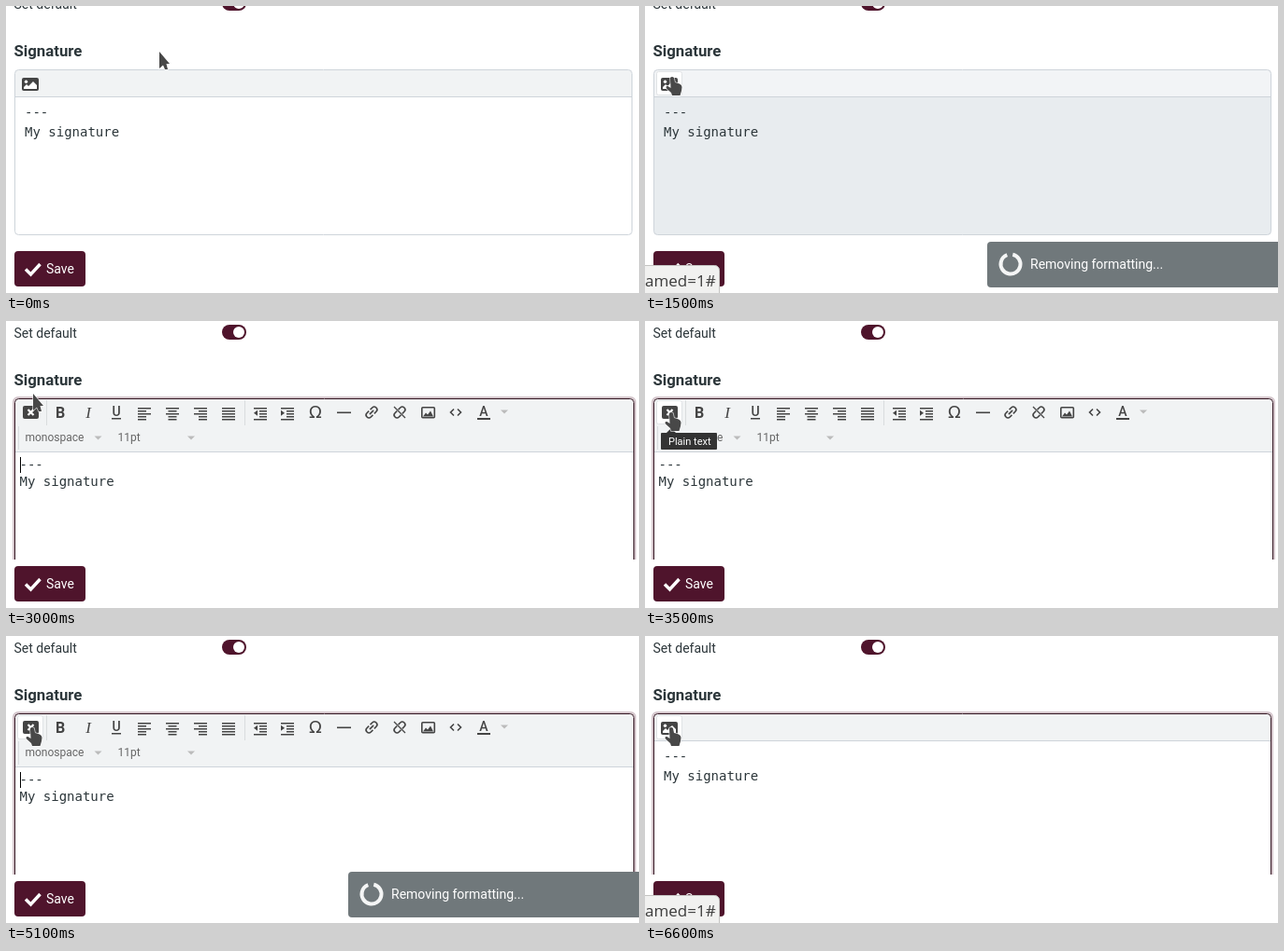
An HTML page with a canvas for the animation above (6.7 s loop, 677 by 308 pixels).

```html
<!DOCTYPE html>
<html lang="en">
<head>
<meta charset="utf-8">
<title>Signature editor</title>
<style>
  html, body { margin: 0; width: 100%; height: 100%; overflow: hidden; background: #fff; }
  canvas { display: block; }
</style>
</head>
<body>
<canvas id="stage" width="677" height="308"></canvas>
<script>
const ctx = document.getElementById('stage').getContext('2d');
const LOOP = 6700, STEP = 100;
const INK = '#2c363a', ICON = '#444', WINE = '#4f142c';
const TO_HTML = 1500, TO_PLAIN = 5100, SWITCH = 300;

const mix = (a, b, k) => a + (b - a) * k;
const clamp = v => Math.max(0, Math.min(1, v));
const between = (t, a, b) => t >= a && t < b;
const mixRgb = (a, b, k) => `rgb(${a.map((v, i) => Math.round(mix(v, b[i], k)))})`;

function box(x, y, w, h, r, fill, stroke, width = 1) {
  ctx.beginPath();
  ctx.roundRect(x, y, w, h, r);
  if (fill) { ctx.fillStyle = fill; ctx.fill(); }
  if (stroke) { ctx.strokeStyle = stroke; ctx.lineWidth = width; ctx.stroke(); }
}

function disc(x, y, r, fill) {
  ctx.beginPath();
  ctx.arc(x, y, r, 0, 7);
  ctx.fillStyle = fill;
  ctx.fill();
}

function text(str, x, y, font, color = INK, align = 'left') {
  ctx.font = font;
  ctx.fillStyle = color;
  ctx.textAlign = align;
  ctx.fillText(str, x, y);
}

function shape(d, x, y, fill, stroke, width = 1) {
  const path = new Path2D(d);
  ctx.save();
  ctx.translate(x, y);
  if (stroke) { ctx.strokeStyle = stroke; ctx.lineWidth = width; ctx.stroke(path); }
  if (fill) { ctx.fillStyle = fill; ctx.fill(path); }
  ctx.restore();
}

const label = (str, x, y, color, size = 14) => text(str, x, y, `${size}px Roboto, sans-serif`, color);
const mono = (str, x, y) => text(str, x, y, '14px "DejaVu Sans Mono", monospace');

function pointer(t) {
  if (t < 2000) {
    const k = clamp((t - 400) / 600), e = (1 - Math.cos(Math.PI * k)) / 2;
    return { x: mix(164, 29, e), y: mix(49, 76, e), hand: between(t, 1000, TO_HTML + SWITCH) };
  }
  if (t < 3000) return { x: 29, y: 76, hand: false };
  const k = clamp((t - 3000) / 500);
  return { x: mix(29, 28, k), y: mix(78, 98, k), hand: k > 0.5 };
}

function drawPointer({ x, y, hand }) {
  const d = hand
    ? 'M-2 1Q0 -1 2 1L3 6L8 7.5Q10.5 8.5 10.5 11L10 15L8.5 20H0L-1 17L-6 12.5Q-7.5 9.5 -4.5 10L-1.5 12Z'
    : 'M0 0V18L4 14.5L6 19H9L7.5 13H11Z';
  shape(d, x, y, '#484848', 'rgba(255,255,255,.75)', 1.5);
}

function drawHeader(y, lock) {
  label('Set default', 8.5, y + 18);
  box(231, y + 4, 26, 16, 8, mixRgb([79, 20, 44], [138, 40, 80], lock));
  disc(249, y + 12, 6, '#fff');
  text('Signature', 8.5, y + 69, 'bold 16.8px Roboto, sans-serif');
}

function drawFrame(y, w, h, bar, focus, fill, barFill) {
  if (focus > 0.5) box(8, y - 1, w + 3, h + 3, 5, null, `rgba(79,20,44,${0.25 * focus})`, 2);
  box(9.5, y + 0.5, w, h, 4, fill);
  box(10, y + 1, w - 1, bar - 1, [3, 3, 0, 0], barFill);
  ctx.fillStyle = '#ced4da';
  ctx.fillRect(10, y + bar, w - 1, 1);
  box(9.5, y + 0.5, w, h, 4, null, mixRgb([206, 212, 218], [50, 20, 32], focus));
}

const hoverBox = y => box(12.5, y + 0.5, 27, 25, 2, '#fff', '#e0e3e5');

function drawPlainEditor(y, lock, locked, focus, hover) {
  drawFrame(y, 660, 177, 29, focus, locked ? '#e8ecef' : '#fff', locked ? '#f2f4f6' : '#f1f3f4');
  if (hover) hoverBox(y + 2);
  box(17, y + 9, 18, 14, 2, ICON);
  disc(21.5, y + 13.3, 1.7, '#fff');
  shape('M0 8V6L3 3L5 5L10 0L14 4V8Z', 19, y + 13, '#fff');
  mono('---', 20, y + 51);
  mono('My signature', 20, y + 72);
}

function drawLines(x, starts, lengths) {
  ctx.fillStyle = ICON;
  starts.forEach((s, i) => ctx.fillRect(x - 7 + s, 93 + i * 3, lengths[i], 1.5));
}

const dropArrow = (x, y) => shape('M-4 -2H4L0 2Z', x, y, '#bbb');

function drawToolbar() {
  const glyph = (str, x, font) => text(str, x, 104, font, ICON, 'center');
  ctx.fillStyle = '#d9dcde';
  ctx.fillRect(43, 85, 1, 27);
  ctx.fillRect(255, 85, 1, 27);
  ctx.fillRect(13, 113, 1, 25);

  box(18, 91, 17, 14, 2, ICON);
  shape('M-3 -3L3 3M3 -3L-3 3', 26.5, 98, null, '#fff', 2.2);

  glyph('B', 58, 'bold 16px Roboto, sans-serif');
  glyph('I', 88, 'italic 17px "Liberation Serif", serif');
  text('U', 118, 102, '500 14px Roboto, sans-serif', ICON, 'center');
  ctx.fillRect(113, 104, 10, 1.5);

  const short = [14, 9, 14, 9, 14].map((n, i) => i === 4 ? 9 : n);
  drawLines(148, [0, 0, 0, 0, 0], short);
  drawLines(178, [0, 2.5, 0, 2.5, 2.5], short);
  drawLines(208, [0, 5, 0, 5, 5], short);
  drawLines(238, [0, 0, 0, 0, 0], [14, 14, 14, 14, 14]);
  for (const [x, dir] of [[272, -1], [301, 1]]) {
    drawLines(x, [0, 6, 6, 6, 0], [14, 8, 8, 8, 14]);
    shape(dir < 0 ? 'M4 -3V3L0 0Z' : 'M0 -3V3L4 0Z', x - 7, 98.8, ICON);
  }

  glyph('Ω', 331, '18px "DejaVu Sans", sans-serif');
  ctx.fillRect(354, 97.5, 15, 1.6);

  const link = 'M-1 -3H-4A3 3 0 0 0 -4 3H-1M1 -3H4A3 3 0 0 1 4 3H1';
  for (const x of [391, 421]) {
    ctx.save();
    ctx.translate(x, 98);
    ctx.rotate(-Math.PI / 4);
    shape(x < 400 ? link + 'M-3 0H3' : link, 0, 0, null, ICON, 1.6);
    ctx.restore();
  }
  shape('M-6 -6L6 6', 421, 98, null, ICON, 1.3);

  box(444.8, 92.8, 13.5, 11, 1, null, ICON, 1.6);
  shape('M-5 4L-2 0L0 2L3 -2L6 4Z', 451, 98.5, ICON);
  shape('M-2 -3.5L-5.5 0L-2 3.5M2 -3.5L5.5 0L2 3.5', 481, 98, null, ICON, 1.6);
  text('A', 511, 102, '500 14px Roboto, sans-serif', ICON, 'center');
  ctx.fillRect(504, 104, 14, 2);
  dropArrow(533, 97.5);

  label('monospace', 20.5, 129, '#666', 12);
  dropArrow(98.5, 125.5);
  label('11pt', 119.5, 129, '#666', 12);
  dropArrow(198, 125.5);
}

function drawHtmlEditor(focus, hover) {
  drawFrame(83, 662, 200, 57, focus, '#fff', '#f1f3f4');
  if (hover) hoverBox(85);
  drawToolbar();
  mono('---', 14.5, 159);
  mono('My signature', 14.5, 177);
}

function drawCaret(x, y) {
  ctx.fillStyle = '#000';
  ctx.fillRect(x, y, 1, 17);
}

function drawSave() {
  box(9, 263, 76, 38, 4, WINE);
  shape('M0 5.5L5.5 11L15.5 0', 21, 277, null, '#fff', 3.4);
  label('Save', 43, 287, '#fff');
}

function drawStatus() {
  box(-2, 278.5, 81.5, 32, [0, 5, 0, 0], '#f1f1f0', '#c4c4c2');
  text('amed=1#', 0, 301, '17px "Open Sans", sans-serif', '#3c3c3c');
}

function drawToast(age) {
  box(366, 253, 315, 49, 4, '#70787b');
  const turn = age / 1000 * Math.PI * 2;
  ctx.lineWidth = 4;
  ctx.strokeStyle = '#f4f5f5';
  ctx.beginPath();
  ctx.arc(391, 277, 10.5, turn - 1.35, turn + 4.35);
  ctx.stroke();
  label('Removing formatting...', 412, 282, '#fff');
}

function drawTooltip() {
  shape('M0 5L5 0L10 5Z', 23, 115, '#333');
  box(17, 120, 60, 18, 1, '#333');
  label('Plain text', 25, 133, '#fff', 11);
}

function draw(t) {
  const start = t < TO_PLAIN ? TO_HTML : TO_PLAIN;
  const age = t - start;
  const locked = between(age, 0, SWITCH);
  const lock = [0, 0.6, 1, 0.8, 0.3][age / STEP] || 0;
  const isHtml = between(t, TO_HTML + SWITCH, TO_PLAIN + SWITCH);
  const scrolled = t >= TO_HTML + SWITCH;
  const focus = t >= TO_PLAIN && isHtml ? 1 : clamp((age - 200) / 300);
  const mouse = pointer(t);

  ctx.fillStyle = '#fff';
  ctx.fillRect(0, 0, 677, 308);

  ctx.save();
  ctx.beginPath();
  ctx.rect(0, 0, 677, 256);
  ctx.clip();
  drawHeader(scrolled ? 0 : -15, lock);
  if (isHtml) {
    drawHtmlEditor(focus, mouse.hand);
    if (between(t, 2100, 3500) || t >= 4400) drawCaret(15, 146);
  } else {
    drawPlainEditor(scrolled ? 83 : 68, lock, locked, focus, mouse.hand);
    if (between(t, TO_PLAIN + SWITCH, 6600)) drawCaret(20, 121);
  }
  ctx.restore();

  drawSave();
  if (between(t, 1200, TO_HTML + SWITCH) || t >= 5600) drawStatus();
  if (locked) drawToast(age);
  if (between(t, 3300, 4700)) drawTooltip();
  drawPointer(mouse);
}

function tick() {
  draw(Math.floor(performance.now() % LOOP / STEP) * STEP);
  requestAnimationFrame(tick);
}
tick();
</script>
</body>
</html>
```
